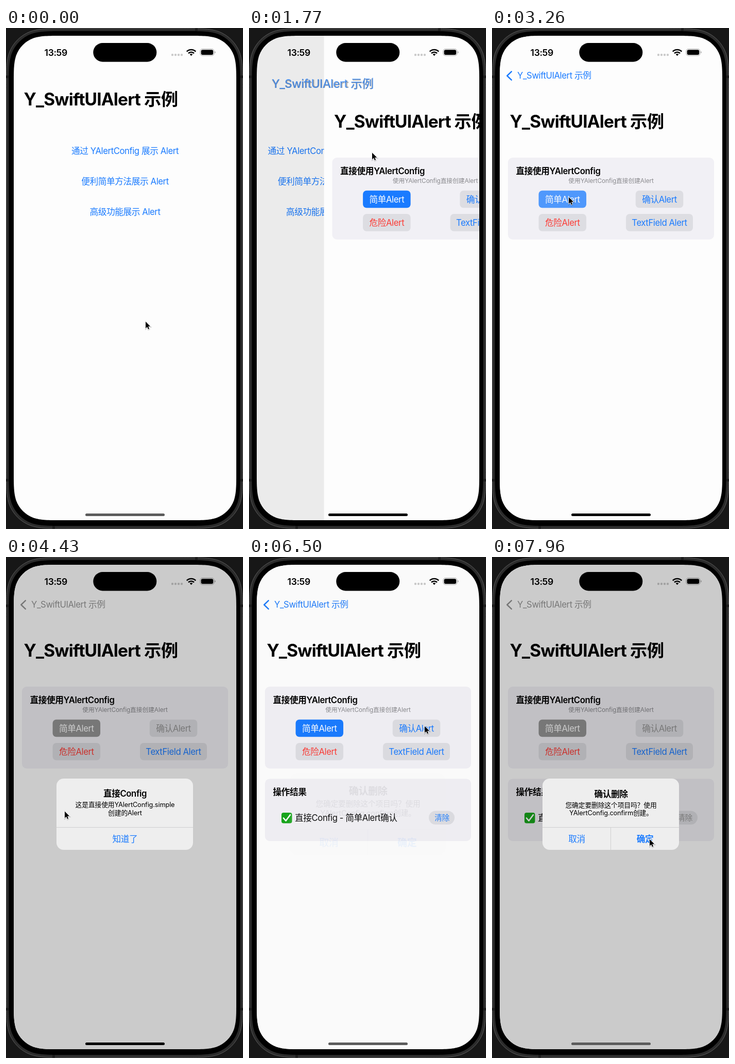
Write an HTML page that moves like this. It is 460 by 970 pixels and loops after 8 s.

```html
<!DOCTYPE html>
<html lang="zh-CN">
<head>
<meta charset="utf-8">
<title>Alert demo</title>
<style>
  html, body { margin: 0; width: 100%; height: 100%; overflow: hidden; background: #171717; }
  svg { display: block; width: 100vw; height: 100vh; }
  text {
    font-family: Inter, "Noto Sans CJK SC", "Noto Sans CJK", sans-serif;
    font-size: 16.7px; letter-spacing: -.42px; font-optical-sizing: none;
  }
  .semi { font-weight: 600; }
  .title { font-size: 33.4px; font-weight: 700; letter-spacing: -.82px; }
  .clock { font-size: 17.6px; font-weight: 600; }
  .caption { font-size: 11.8px; letter-spacing: -.1px; }
  .message { font-size: 12.8px; letter-spacing: -.15px; }
  .pill { font-size: 14.7px; }
  .mid { text-anchor: middle; }
</style>
</head>
<body>
<svg id="stage" viewBox="0 0 460 970"></svg>
<script>
const LOOP = 8000, TICK = 147.4;
const BLUE = [26, 123, 255], GRAY = [148, 148, 148];
const PAGE = '#fdfdfd', CARD = '#f1f0f5', KEY = '#dddde2', RED = '#fc3c36';
const APP = 'Y_SwiftUIAlert 示例';

const START = { x: 270, y: 567 };
// Each move eases to (x, y); bow bends its path sideways
const MOVES = [
  { from: 150, to: 1330, x: 238, y: 240, bow: -20 },
  { from: 1780, to: 2800, x: 148, y: 326, bow: 0 },
  { from: 3540, to: 4420, x: 113, y: 491, bow: 0 },
  { from: 4420, to: 5015, x: 238, y: 541, bow: 85 },
  { from: 5460, to: 6050, x: 340, y: 326, bow: 0 },
  { from: 6640, to: 7370, x: 198, y: 525, bow: 0 },
  { from: 7370, to: 7950, x: 305, y: 545, bow: 0 }
];

const clamp = v => Math.max(0, Math.min(1, v));
const lerp = (a, b, k) => a + (b - a) * k;
const smooth = k => k * k * (3 - 2 * k);
const mix = (a, b, k) => `rgb(${a.map((v, i) => Math.round(lerp(v, b[i], k)))})`;
const blue = mix(BLUE, GRAY, 0);

// Critically damped spring from 0 to 1
function spring(ms, speed = .016) {
  const w = Math.max(0, ms) * speed;
  return 1 - (1 + w) * Math.exp(-w);
}

function cursorAt(t) {
  let { x, y } = START;
  for (const move of MOVES) {
    const k = smooth(clamp((t - move.from) / (move.to - move.from)));
    x = lerp(x, move.x, k) + move.bow * Math.sin(Math.PI * k);
    y = lerp(y, move.y, k);
  }
  return [x, y];
}

const rect = (x, y, w, h, r, fill, extra = '') =>
  `<rect x="${x}" y="${y}" width="${w}" height="${h}" rx="${r}" fill="${fill}" ${extra}/>`;
const text = (x, y, s, fill = '#000', cls = '') =>
  `<text x="${x}" y="${y}" fill="${fill}" class="${cls}">${s}</text>`;
const line = (x1, y1, x2, y2, stroke) =>
  `<path d="M${x1} ${y1}L${x2} ${y2}" stroke="${stroke}"/>`;
const fullPage = (fill, extra = '') => rect(15, 15, 432, 938, 0, fill, extra);

// Rounded box with continuous-curvature corners
function squircle(x, y, w, h, r, extra) {
  const edge = [[0, 1.5287], [0, 1.0885], [0, .8684], [.0749, .6315], [.1691, .3728]];
  const corner = [...edge, ...edge.map(([a, b]) => [b, a]).reverse()];
  const points = [[0, 0], [1, 0], [1, 1], [0, 1]].flatMap(([right, low]) => {
    const turn = right === low ? corner : [...corner].reverse();
    return [turn.map(([a, b]) => [
      right ? x + w - a * r : x + a * r,
      low ? y + h - b * r : y + b * r
    ].map(v => v.toFixed(2)).join(' '))];
  });
  const d = points.map(([first, ...curve], i) => `${i ? 'L' : 'M'}${first}C${curve.join(' ')}`);
  return `<path d="${d.join('')}Z" ${extra}/>`;
}

const button = (id, cx, y, w, label, bg, fill) =>
  `<g id="${id}">${rect(cx - w / 2, y, w, 33.5, 7, bg)}${text(cx, y + 22.7, label, fill, 'mid')}</g>`;

const alertBox = (id, title, lines, actions) => `<g id="${id}">
  ${rect(98, 429, 265, 138, 14, '#eee')}
  ${text(231, 464.5, title, '#000', 'mid semi')}
  ${lines.map((s, i) => text(231, 484.5 + i * 15.8, s, '#000', 'mid message')).join('')}
  ${line(98, 523.5, 363, 523.5, '#cfcfd0')}${actions}</g>`;

const device = `
  ${rect(0, 0, 460, 970, 0, '#171717')}
  ${squircle(.5, 1, 459, 968, 75, 'fill="#2b2b2b" stroke="#5a5a5a"')}
  ${squircle(5.5, 6, 449, 958, 70, '')}
  ${[92, 873].map(y => rect(0, y, 5, 5, 0, '#1c1c1c') + rect(455, y, 5, 5, 0, '#1c1c1c')).join('')}
  ${rect(367, 1, 5, 5, 0, '#1c1c1c')}${rect(90, 964, 5, 5, 0, '#1c1c1c')}`;

const listPage = `<g id="list">${fullPage(PAGE)}
  ${['通过 YAlertConfig 展示 Alert', '便利简单方法展示 Alert', '高级功能展示 Alert']
    .map((s, i) => text(231, 244 + i * 59, s, blue, 'mid')).join('')}</g>
  ${fullPage('#000', 'id="shade"')}`;

const results = `<g id="results">${rect(31, 429.5, 400, 120.5, 9, CARD)}
  ${text(46.5, 461, '操作结果', '#000', 'semi')}
  ${rect(63, 495, 20.5, 20.5, 4, '#18a61c')}
  <path d="M67 505.5l4.5 5.2 8.5-11.5" fill="none" stroke="#fff" stroke-width="2.6" stroke-linecap="round" stroke-linejoin="round"/>
  ${text(89, 511, '直接Config - 简单Alert确认')}
  ${rect(349, 491.5, 50, 26.5, 13.2, KEY)}
  ${text(374.5, 510.2, '清除', blue, 'mid pill')}</g>`;

const detailPage = `<g id="detail">${fullPage(PAGE)}
  ${text(34.5, 193, APP, '#000', 'title')}
  ${rect(31, 251, 400, 158.5, 9, CARD)}
  ${text(46.5, 283, '直接使用YAlertConfig', '#000', 'semi')}
  ${text(231, 300, '使用YAlertConfig直接创建Alert', '#8a8a8e', 'mid caption')}
  ${button('simple', 136.8, 314.8, 92.5, '简单Alert', blue, '#fff')}
  ${button('confirm', 325, 314.8, 92.5, '确认Alert', KEY, blue)}
  ${button('danger', 136.8, 360, 92.5, '危险Alert', KEY, RED)}
  ${button('field', 325, 360, 130, 'TextField Alert', KEY, blue)}
  ${results}</g>`;

const navBar = `
  <g id="large">${text(-.5, 0, APP, '#000', 'title')}</g>
  <g id="back">${text(0, 0, APP, blue)}</g>
  <path id="chevron" d="M37.8 84.3L29.3 92.5L37.8 100.7" fill="none" stroke-width="2.5" stroke-linecap="round" stroke-linejoin="round"/>`;

const statusBar = `
  ${text(96.7, 53.8, '13:59', '#000', 'mid clock')}
  ${[0, 1, 2, 3].map(i => `<circle cx="${323 + i * 6}" cy="52" r="2.2" fill="#cacaca"/>`).join('')}
  <g fill="none" stroke="#000" stroke-width="2.7">
    <path d="M350.8 45.6a12.3 12.3 0 0 1 17.4 0M354 49a7.8 7.8 0 0 1 11 0"/>
    <path d="M359.5 54l-2.8-2.9a4 4 0 0 1 5.6 0z" fill="#000" stroke="none"/>
  </g>
  ${rect(376.9, 40.6, 27, 13, 4.3, 'none', 'stroke="#a5a5a5"')}
  ${rect(378.6, 42.3, 23.6, 9.6, 2.9, '#000')}
  <path d="M405.2 45v4.2q1.6-.6 1.6-2.1t-1.6-2.1" fill="#a5a5a5"/>`;

const alerts =
  alertBox('notice', '直接Config', ['这是直接使用YAlertConfig.simple', '创建的Alert'],
    text(231, 552, '知道了', blue, 'mid')) +
  alertBox('question', '确认删除', ['您确定要删除这个项目吗？使用', 'YAlertConfig.confirm创建。'],
    line(230.5, 523.5, 230.5, 567, '#cfcfd0') +
    text(164.5, 552, '取消', blue, 'mid') + text(297, 552, '确定', blue, 'mid semi'));

const arrow = 'M1 1.4V14.4L4 11.6L6 16.2L8 15.3L6.1 10.8H10.2Z';

document.getElementById('stage').innerHTML = `
  <defs><clipPath id="screen">${squircle(15, 15, 432, 938, 61, '')}</clipPath></defs>
  ${device}
  <g clip-path="url(#screen)">${listPage}${detailPage}${navBar}${statusBar}
    ${fullPage('#000', 'id="dim"')}</g>
  ${rect(169.3, 29, 123, 36.4, 18.2, '#000')}
  ${alerts}
  ${rect(154, 940, 154, 5, 2.5, '#000', 'id="home"')}
  <g id="cursor">
    <path d="${arrow}" transform="translate(.3 1)" fill="none" stroke="#000" stroke-opacity=".18" stroke-width="2.4"/>
    <path d="${arrow}" stroke="#fff" stroke-width="1.6" stroke-linejoin="round" paint-order="stroke"/>
  </g>`;

const $ = id => document.getElementById(id);
const set = (el, attrs) => Object.entries(attrs).forEach(([k, v]) => el.setAttribute(k, v));
const show = (id, on) => set($(id), { visibility: on ? 'visible' : 'hidden' });

function drawPush(p) {
  const q = p ** 1.18;
  const place = `translate(${lerp(35, 49, q)} ${lerp(150, 98.2, q)})`;
  set($('list'), { transform: `translate(${-129.6 * p} 0)` });
  set($('shade'), { opacity: .1 * p });
  set($('detail'), { transform: `translate(${432 * (1 - p)} 0)` });
  set($('large'), { transform: `${place} scale(${lerp(1, .48, q)})`, opacity: 1 - p });
  set($('back'), { transform: `${place} scale(${lerp(2.09, 1, q)})`, opacity: p });
  set($('chevron'), { opacity: clamp((p - .75) * 4) });
}

function drawTint(amount) {
  const nav = mix(BLUE, GRAY, amount);
  const tint = mix(BLUE, GRAY, clamp((amount - .3) * 4));
  set($('back').firstChild, { fill: nav });
  set($('chevron'), { stroke: nav });
  for (const el of [$('simple').firstChild, $('confirm').lastChild, $('results').lastChild])
    set(el, { fill: tint });
}

function drawAlert(t, amount) {
  const second = t >= 6000;
  const closing = t > 5000 && !second;
  const scale = closing ? 1 : 1 + .155 * (1 - amount);
  set($('dim'), { opacity: .2 * amount });
  for (const id of ['notice', 'question']) {
    show(id, amount > 0 && second === (id === 'question'));
    set($(id), {
      opacity: 1 - (1 - amount) ** 1.3,
      transform: `translate(230.5 498) scale(${scale}) translate(-230.5 -498)`
    });
  }
}

function draw(time) {
  const t = Math.floor(time / TICK) * TICK;
  const amount = clamp(spring(t - 3366) - spring(t - 5165, .025) + spring(t - 6463));
  drawPush(spring(t - 1617));
  drawTint(amount);
  drawAlert(t, amount);
  show('results', t >= 5590);
  set($('simple'), { opacity: t > 3200 && t < 3366 ? .75 : 1 });
  set($('confirm'), { opacity: t > 6300 && t < 6463 ? .75 : 1 });
  set($('home'), { fill: t < 1617 || t > 5165 ? '#5c5c5c' : '#000' });
  set($('cursor'), { transform: `translate(${cursorAt(t)})` });
}

const start = performance.now();
function tick() {
  draw((performance.now() - start) % LOOP);
  requestAnimationFrame(tick);
}
tick();
</script>
</body>
</html>
```
